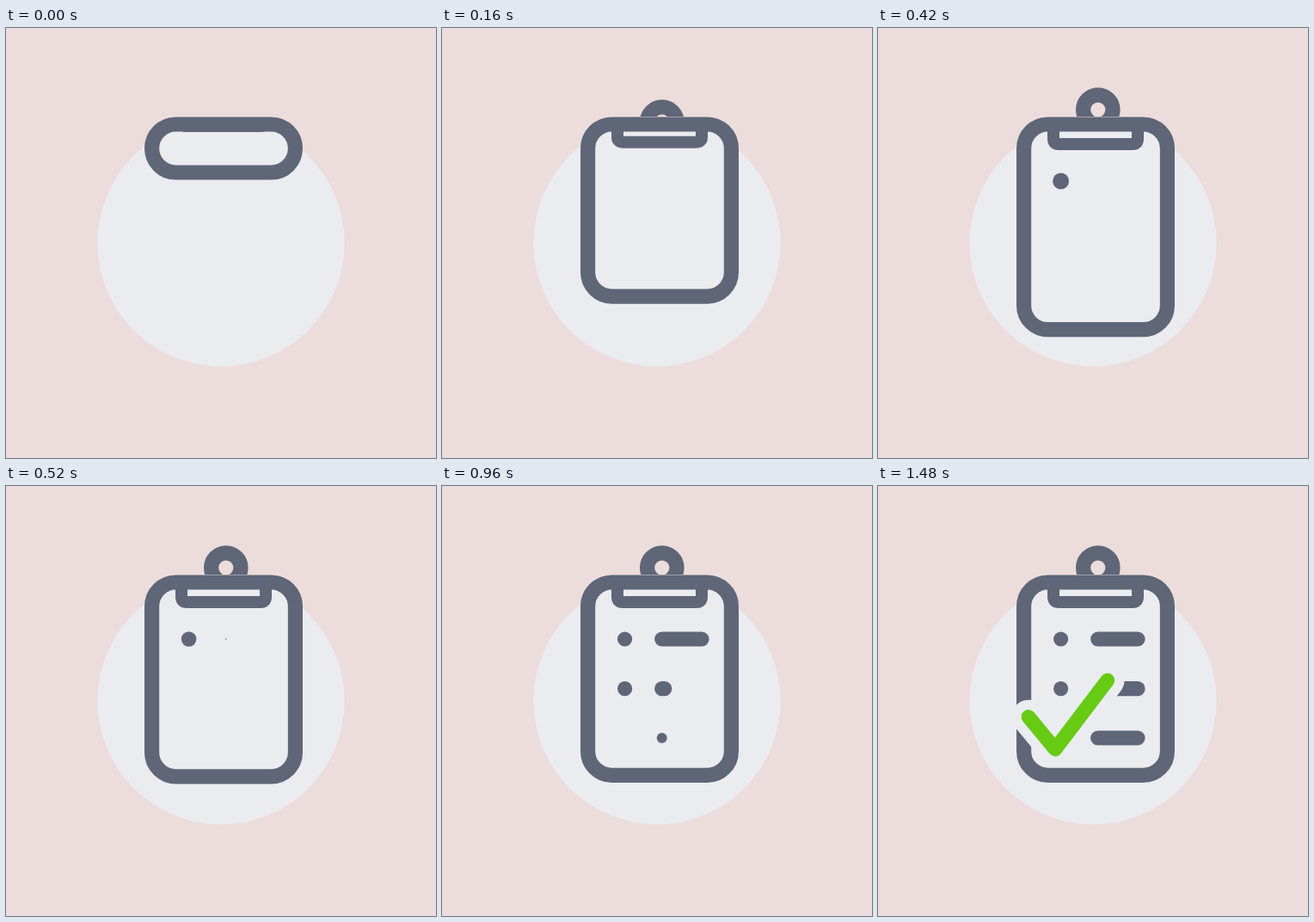
Animation of 500x500 px, one loop 2220 ms. Source, as an HTML page:

```html
<!DOCTYPE html>
<html lang="en">
<head>
<meta charset="utf-8">
<title>Checklist</title>
<style>
  html, body { margin: 0; width: 100%; height: 100%; overflow: hidden; background: #ecdddc; }
  svg { display: block; width: 100vw; height: 100vh; }
  .ink { fill: none; stroke: #5f6678; stroke-width: 17.2; stroke-linecap: round; }
  .dot { fill: #5f6678; }
  .tick { fill: none; stroke-linecap: round; stroke-linejoin: round; }
</style>
</head>
<body>
<svg viewBox="0 0 500 500">
  <defs>
    <clipPath id="above"><rect x="200" width="120" height="103"/></clipPath>
    <clipPath id="below"><rect x="180" y="112" width="150" height="60"/></clipPath>
  </defs>
  <circle cx="250" cy="250" r="143.5" fill="#ebecf0"/>
  <g clip-path="url(#above)"><circle id="ring" class="ink" cx="255.8" r="17.2"/></g>
  <g clip-path="url(#below)">
    <path id="plate" class="ink" style="stroke-width:14;stroke-linecap:butt"
      d="M204 80V129q0 6 6 6H296q6 0 6-6V80"/>
  </g>
  <rect id="board" class="ink" x="169.6" y="112" width="166.8" rx="28"/>
  <circle id="dot1" class="dot" cx="212.6" cy="178"/>
  <circle id="dot2" class="dot" cx="212.6" cy="235.7"/>
  <path id="line1" class="ink"/>
  <path id="line2" class="ink"/>
  <path id="line3" class="ink"/>
  <path id="halo" class="tick" stroke="#ebecf0" stroke-width="39.5"/>
  <path id="tick" class="tick" stroke="#66cb12" stroke-width="16.8"/>
</svg>
<script>
  const LOOP = 2220, STEP = 20;
  const $ = id => document.getElementById(id);
  const inOut = u => (1 - Math.cos(Math.PI * u)) / 2;
  const out = u => Math.sin(Math.PI * u / 2);

  // keys: [time, value, easing into this key]
  function track(t, keys) {
    if (t <= keys[0][0]) return keys[0][1];
    for (let i = 1; i < keys.length; i++) {
      const [t0, a] = keys[i - 1], [t1, b, ease = inOut] = keys[i];
      if (t < t1) return a + (b - a) * ease((t - t0) / (t1 - t0));
    }
    return keys[keys.length - 1][1];
  }

  function drawLine(id, y, t, pop, grow) {
    const el = $(id);
    const width = track(t, [[pop, 0], [pop + 100, 17.2]]);
    const x = track(t, [[grow, 255.7], [grow + 220, 302]]);
    el.setAttribute('d', `M255.7 ${y}H${x + 0.01}`);
    el.style.strokeWidth = width;
    el.style.visibility = width > 0 ? 'visible' : 'hidden';
  }

  function drawDot(id, t, start) {
    $(id).setAttribute('r', track(t, [[start, 0], [start + 100, 10.5], [start + 200, 8.6]]));
  }

  const A = [175, 268.5], B = [206, 306], C = [266.8, 226];
  const dist = (p, q) => Math.hypot(q[0] - p[0], q[1] - p[1]);
  const toward = (p, q, len) => p.map((v, i) => v + (q[i] - v) * len / dist(p, q));

  function drawTick(t) {
    const short = dist(A, B), full = short + dist(B, C);
    const len = track(t, [[980, 0], [1225, full + 2.3], [1480, full]]);
    const d = len <= short
      ? `M${A}L${toward(A, B, len + 0.01)}`
      : `M${A}L${B}L${toward(B, C, len - short)}`;
    for (const id of ['halo', 'tick']) {
      $(id).setAttribute('d', d);
      $(id).style.visibility = len > 0 ? 'visible' : 'hidden';
    }
  }

  function draw(t) {
    const bottom = track(t, [[0, 176.6], [300, 370.5, out], [560, 345]]);
    $('board').setAttribute('height', bottom - 120.6);
    $('ring').setAttribute('cy', track(t, [[80, 130], [250, 84], [400, 95]]));
    $('plate').setAttribute('transform', `translate(0 ${track(t, [[0, -21], [230, 0, out]])})`);
    drawDot('dot1', t, 340);
    drawDot('dot2', t, 600);
    drawLine('line1', 178, t, 500, 611);
    drawLine('line2', 235.7, t, 820, 924);
    drawLine('line3', 293, t, 897, 990);
    drawTick(t);
  }

  const start = performance.now();
  function frame() {
    const t = (performance.now() - start) % LOOP;
    draw(Math.floor(t / STEP) * STEP);
    requestAnimationFrame(frame);
  }
  frame();
</script>
</body>
</html>
```
